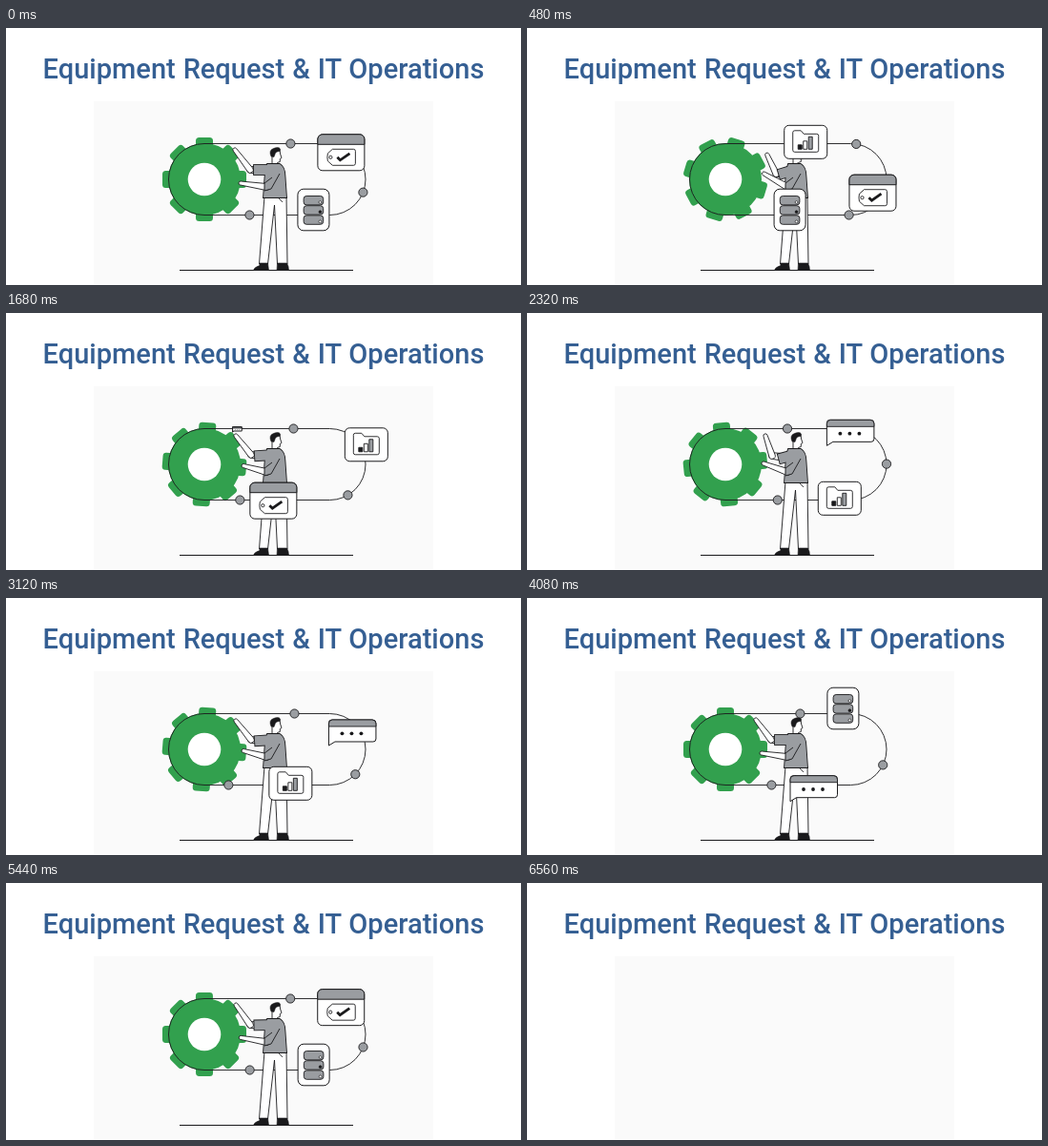
Recreate the animation shown at these times as an HTML page with a canvas. Size 540 by 270 pixels, loop 7.04 s.

```html
<!DOCTYPE html>
<html lang="en">
<head>
<meta charset="utf-8">
<title>Equipment Request &amp; IT Operations</title>
<style>
html, body { margin: 0; width: 100%; height: 100%; overflow: hidden; background: #fff; }
canvas { position: absolute; left: 0; top: 0; }
h1 {
  position: absolute; left: 0; top: 25px; width: 540px; margin: 0; z-index: 1;
  font: 500 29px/36px Roboto, "Open Sans", sans-serif; word-spacing: .8px;
  text-align: center; white-space: nowrap; color: #355f93;
}
</style>
</head>
<body>
<h1>Equipment Request &amp; IT Operations</h1>
<canvas id="stage" width="540" height="270"></canvas>
<script>
const c = document.getElementById('stage').getContext('2d');
const INK = '#1a1a1c', GREY = '#9a9da1', PAPER = '#fafafa', WHITE = '#fff', GREEN = '#32a04e';
const LOOP = 7040, STEP = 80, BLANK = 6560, TURN = 1440, MOVE = 1150;
// Conveyor: two straight runs joined by half circles
const LEFT = 208, RIGHT = 339.5, MID = 159, R = 37.5;
const RUN = RIGHT - LEFT, ARC = Math.PI * R, LAP = 504;
let zoom = 1;  // outlines keep their weight while cards grow and shrink

const clamp = v => Math.max(0, Math.min(1, v));
const mod = (a, n) => ((a % n) + n) % n;

function paint(path, fill, line = .9) {
  if (fill) { c.fillStyle = fill; c.fill(path); }
  if (line) { c.strokeStyle = INK; c.lineWidth = line / zoom; c.stroke(path); }
}
const shape = (d, fill, line) => paint(new Path2D(d), fill, line);
function box(x, y, w, h, r, fill, line) {
  const p = new Path2D();
  p.roundRect(x, y, w, h, r);
  paint(p, fill, line);
}
function disc(x, y, r, fill, line) {
  const p = new Path2D();
  p.arc(x, y, r, 0, 7);
  paint(p, fill, line);
}
function limb(x0, y0, r0, x1, y1, r1) {
  const a = Math.atan2(y1 - y0, x1 - x0), q = Math.PI / 2, p = new Path2D();
  p.arc(x0, y0, r0, a + q, a - q);
  p.arc(x1, y1, r1, a - q, a + q);
  p.closePath();
  paint(p, WHITE);
}

function along(s) {
  if (s < RUN) return [LEFT + s, MID - R];
  if (s < RUN + ARC) {
    const a = (s - RUN) / R;
    return [RIGHT + R * Math.sin(a), MID - R * Math.cos(a)];
  }
  return [RIGHT - (s - RUN - ARC), MID + R];
}

function checkCard() {
  box(-24.5, -19, 49, 38, 5, WHITE, 1);
  box(-24.5, -19, 49, 10.5, [5, 5, 0, 0], GREY, 1);
  shape('M-9 -3.5H13Q15 -3.5 15 -1.5V11.5Q15 13.5 13 13.5H-9L-14 9Q-15 5 -14 1Z', WHITE);
  disc(-11, 5, 1.6, WHITE);
  shape('M-4 5L-1 8L9 1', null, 2.8);
}
function chartCard() {
  box(-22.5, -17.5, 45, 35, 5, WHITE, 1);
  shape('M-13.5 -10Q-13.5 -12 -11.5 -12H-5L-2 -8.5H11.5Q13.5 -8.5 13.5 -6.5V8.5Q13.5 10.5 11.5 10.5H-11.5Q-13.5 10.5 -13.5 8.5Z', WHITE);
  box(-8, 3, 4, 4.5, 0, INK);
  box(-2.5, -1, 4, 8.5, 0, WHITE);
  box(3, -5.5, 4, 13, 0, GREY);
}
function chatCard() {
  shape('M-21.5 -11.5H21.5Q25 -11.5 25 -8V8.5Q25 11.5 22 11.5H-18L-24.5 15.5V-8Q-24.5 -11.5 -21.5 -11.5Z', WHITE, 1);
  box(-24.5, -11.5, 49.5, 7, [4, 4, 0, 0], GREY);
  for (const x of [-10.5, -.5, 9.5]) disc(x, 2.8, 1.9, INK, 0);
}
function serverCard() {
  box(-16.5, -21.8, 33, 43.6, 6, WHITE, 1);
  for (let i = 0; i < 3; i++) {
    box(-10.3, -14.5 + i * 10.2, 20.6, 9.4, 3, GREY);
    disc(7, -8 + i * 10.2, 1.4, i === 1 ? INK : WHITE, .7);
  }
}
// lag along the belt, offset from it, picture
const cards = [
  [0, -12, .7, checkCard],
  [126, 6, -1.7, chartCard],
  [254.6, -7.5, 1.7, chatCard],
  [403.5, -8.5, -5.5, serverCard]
];
const dots = [67, 203, 328, 457];

function drawBelt(travel) {
  for (const lag of dots) {
    const s = mod(travel - lag, LAP);
    const k = Math.min(clamp((s - 25) / 12), clamp((368 - s) / 12));
    if (k > 0) disc(...along(s), 4.6 * k, GREY);
  }
  for (const [lag, dx, dy, draw] of cards) {
    const s = mod(travel - lag, LAP);
    zoom = Math.min(clamp((s - 34) / 40), clamp((362 - s) / 40));
    if (zoom <= 0) continue;
    const [x, y] = along(s);
    c.save();
    c.translate(x + dx, y + dy * zoom);
    c.scale(zoom, zoom);
    draw();
    c.restore();
  }
  zoom = 1;
}

function drawGear(angle) {
  c.save();
  c.translate(LEFT, MID);
  c.rotate(angle);
  for (let i = 0; i < 4; i++) {
    box(-9, -44, 18, 88, 3.5, GREEN, 0);
    c.rotate(Math.PI / 4);
  }
  c.restore();
  disc(LEFT, MID, 38, GREEN, 0);
  disc(LEFT, MID, 17.3, WHITE, 0);
  const p = new Path2D();
  p.roundRect(LEFT - R, MID - R, RUN + 2 * R, 2 * R, R);
  paint(p);
}

// time, upper hand, upper elbow, sleeve end, lower hand
const poses = [
  [0, 240, 128, 256, 149, 265, 149, 246, 163],
  [240, 241, 129, 257, 149, 266, 150, 249, 160.5],
  [640, 259, 136, 264, 156, 271, 154, 248, 148],
  [880, 250, 129, 257, 150, 269, 152, 248, 158],
  [MOVE, 240, 128, 256, 149, 265, 149, 246, 163]
];
function poseAt(t) {
  if (t >= MOVE) return poses[0];
  const i = poses.findIndex(p => p[0] > t), a = poses[i - 1], b = poses[i];
  const k = (t - a[0]) / (b[0] - a[0]);
  return a.map((v, j) => v + (b[j] - v) * k);
}

function drawPerson(t) {
  const [, hx, hy, ex, ey, sx, sy, lx, ly] = poseAt(t);
  shape('M182 254.5H364', null, 1);
  shape('M271 177L265.5 248H274.5L281.5 186L284.5 248H295L294 177Z', WHITE);
  shape('M266 247H274.5L275.5 254.5H259.5Q260 251.5 266 249.5Z', INK, .6);
  shape('M284.5 247H294.5Q296.5 250 296.5 254.5H284Z', INK, .6);

  shape('M279 146V134Q280 127 287 127.5L287.5 132L289 136.5L287.3 137.5V140.5L284.5 141.5V146Z', WHITE);
  shape('M278 135Q275 128.5 280.5 126.5Q286 124.5 287.5 127L287 129.5Q283 129.5 282.3 132L281 135.5Z', INK, .5);

  limb(sx + 4, sy, 4, ex, ey, 3.3);
  limb(ex, ey, 3.3, hx, hy, 2.1);

  const torso = new Path2D('M274 143H287Q292.5 146 292.5 156L294 178H270L272 150Z');
  const sleeve = new Path2D(`M280 149L${sx} ${sy}`);
  c.lineCap = 'square';
  c.strokeStyle = INK;
  c.lineWidth = 11.8;
  c.stroke(sleeve);
  paint(torso, null, 1.8);
  c.strokeStyle = c.fillStyle = GREY;
  c.lineWidth = 10;
  c.stroke(sleeve);
  c.fill(torso);
  c.lineCap = 'butt';

  limb(273, 167, 3.5, lx, ly, 2);
  shape('M287 153L278 169L270.5 171L271 163L279 157Z', GREY, 0);
  shape('M287 153L278 169L271 171V163L279 157', null, .9);
  shape('M285 178L290 183', null, .8);
}

function render(t) {
  c.clearRect(0, 0, 540, 270);
  c.fillStyle = PAPER;
  c.fillRect(92, 77, 356, 192);
  if (t >= BLANK) return;
  const turn = Math.min(4, Math.floor(t / TURN));
  const local = turn < 4 ? t - turn * TURN : 0;
  const done = turn + (1 - Math.cos(Math.PI * clamp(local / MOVE))) / 2;
  drawGear(done * Math.PI / 4);
  drawPerson(local);
  drawBelt(157.4 + 126 * done);
}

const start = performance.now();
function frame() {
  const t = (performance.now() - start) % LOOP;
  render(Math.floor(t / STEP) * STEP);
  requestAnimationFrame(frame);
}
frame();
</script>
</body>
</html>
```
